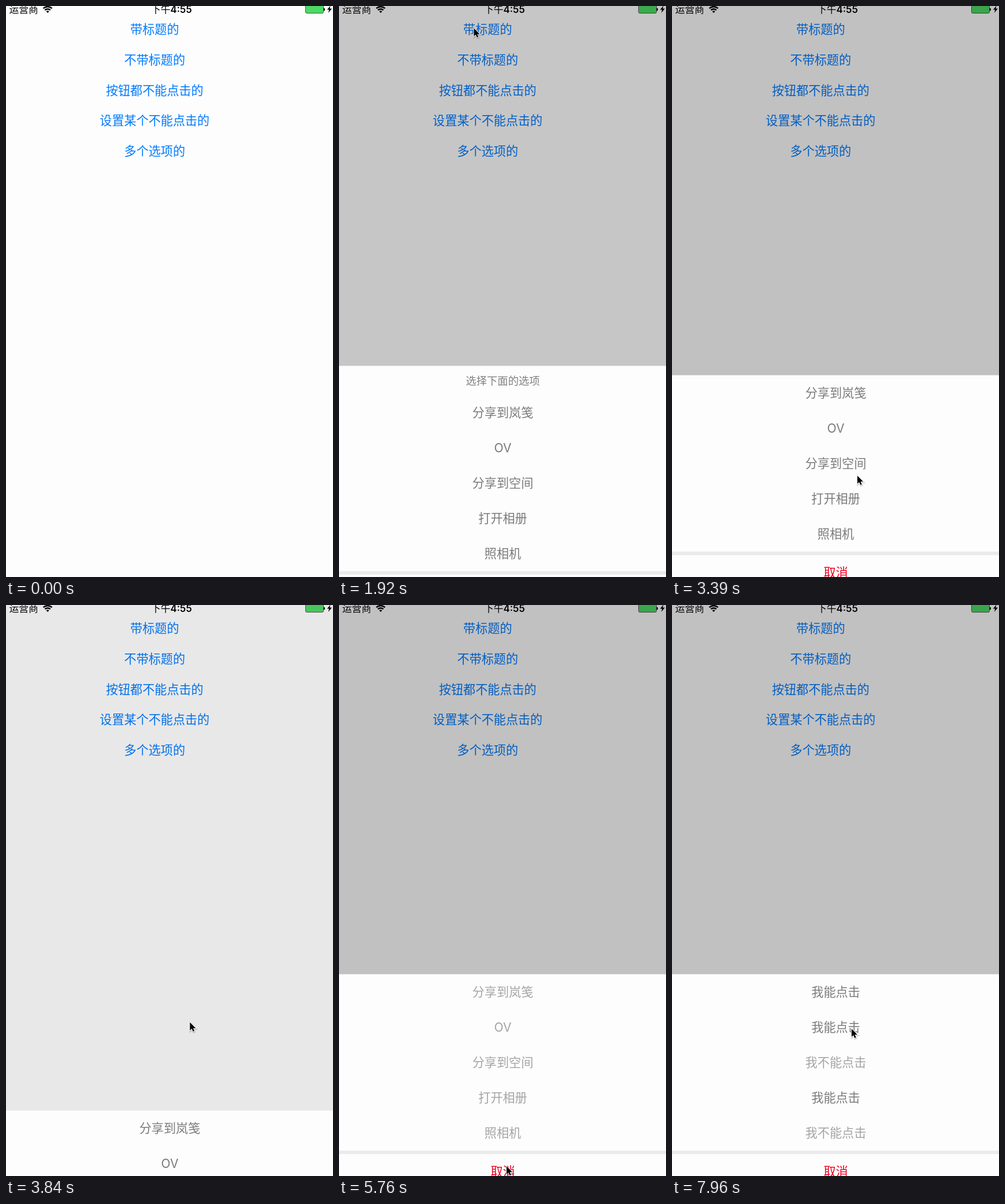
Write an HTML page that moves like this. It is 566 px wide and 989 px high and loops after 8 s.

```html
<!DOCTYPE html>
<html lang="zh-CN">
<head>
<meta charset="utf-8">
<title>Action sheet</title>
<style>
  html, body { margin: 0; width: 100%; height: 100%; overflow: hidden; background: #fdfdfd; }
  svg { display: block; width: 100vw; height: 100vh; }
  text { font-family: Inter, "Noto Sans CJK SC", "Noto Sans CJK", sans-serif; font-size: 21.1px; }
  .mid { text-anchor: middle; }
  .status { font-size: 16.8px; }
</style>
</head>
<body>
<svg id="stage" viewBox="0 0 566 989">
  <rect width="566" height="989" fill="#fdfdfd"/>
  <g id="statusBar">
    <text class="status" x="5.5" y="12.4">运营商</text>
    <g fill="none" stroke="#000" stroke-width="2.5">
      <path d="M64.6 4.2A10.8 10.8 0 0 1 79.6 4.2"/>
      <path d="M67.4 7.2A6.8 6.8 0 0 1 76.8 7.2"/>
    </g>
    <path d="M69.6 9.4A3.7 3.7 0 0 1 74.6 9.4L72.1 12Z"/>
    <text class="status" x="251" y="12.4" font-weight="500">下午</text>
    <text class="status" x="284.6" y="12" font-weight="600">4:55</text>
    <rect x="518.5" y="-4" width="31" height="16.5" rx="2" fill="#4cd964" stroke="#555" stroke-width="1"/>
    <path d="M550 3.2Q552 3.4 552 6T550 8.6Z"/>
    <path d="M561.5 -.5L555.8 6.6H559.3L557.8 12L564 4.6H560.4Z"/>
  </g>
  <g id="buttons" fill="#007aff"></g>
  <rect id="dim" width="566" height="989"/>
  <g id="sheets"></g>
  <g id="cursor">
    <path d="M0 0V14L3.2 11L5.4 16L7.8 15L5.6 10.2H10Z" transform="translate(.6 1.4)"
      fill="none" stroke="#000" stroke-opacity=".16" stroke-width="3"/>
    <path d="M0 0V14L3.2 11L5.4 16L7.8 15L5.6 10.2H10Z" stroke="#fff" stroke-width="1.6" paint-order="stroke"/>
  </g>
</svg>
<script>
const LOOP = 8000, TICK = 147.4;
const SLIDE = 320, FADE = 450, BOTTOM = 1003;
const $ = id => document.getElementById(id);

function add(parent, tag, attrs, text = '') {
  const node = document.createElementNS('http://www.w3.org/2000/svg', tag);
  for (const key in attrs) node.setAttribute(key, attrs[key]);
  node.textContent = text;
  return parent.appendChild(node);
}

const label = (parent, text, x, centre, attrs) =>
  add(parent, 'text', { class: 'mid', x, y: centre + 7.9, ...attrs }, text);

const buttons = ['带标题的', '不带标题的', '按钮都不能点击的', '设置某个不能点击的', '多个选项的']
  .map((text, i) => label($('buttons'), text, 257.3, 40.3 + i * 52.7));

const SHARE = ['分享到岚笺', 'OV', '分享到空间', '打开相册', '照相机'];
const CLICK = ['我能点击', '我能点击', '我不能点击', '我能点击', '我不能点击'];

// Each cycle: button pressed, released (sheet rises), sheet starts to close
const cycles = [
  { press: 400, open: 690, close: 1860, items: SHARE, title: '选择下面的选项' },
  { press: 2640, open: 2820, close: 3640, items: SHARE },
  { press: 4270, open: 4430, close: 5850, items: SHARE, off: [0, 1, 2, 3, 4] },
  { press: 6900, open: 7110, close: 9000, items: CLICK, off: [2, 4] }
];

function buildSheet(cycle) {
  const { items, title, off = [] } = cycle;
  const g = add($('sheets'), 'g', {});
  cycle.top = title ? 589.5 : 639.5;
  add(g, 'rect', { y: cycle.top, width: 566, height: 1012 - cycle.top, fill: '#fdfdfd' });
  if (title) label(g, title, 283.5, 614.2, { fill: '#808080', style: 'font-size:18.3px' });
  items.forEach((text, i) =>
    label(g, text, 283.5, 670 + i * 61, { fill: off.includes(i) ? '#a5a5a5' : '#7b7b7b' }));
  add(g, 'rect', { y: 945, width: 566, height: 6, fill: '#ebebeb' });
  label(g, '取消', 283.5, 981, { fill: '#f0001e', 'font-weight': 500 });
  cycle.node = g;
}
cycles.forEach(buildSheet);

// Pointer stops: time, x, y
const path = [
  [60, 220, -20], [450, 233.5, 38.5], [2070, 233.5, 38.5], [2340, 286, 93.5],
  [2830, 286, 93.5], [3380, 320.8, 813.5], [3700, 320.8, 813.5], [4270, 303, 150],
  [4420, 303, 150], [4569, 303, 188.5], [5010, 309, 771], [5170, 309, 771],
  [5300, 329, 848], [5560, 329, 848], [5720, 290, 972], [5850, 290, 972],
  [6600, 262, 203], [6760, 262, 203], [6900, 266.5, 191], [7100, 266.5, 191],
  [7810, 317, 770], [7830, 317, 770], [7950, 310.8, 734]
];

function ease(v) {
  const x = Math.min(1, Math.max(0, v));
  return x * x * (3 - 2 * x);
}

function pointer(t) {
  const next = path.findIndex(stop => stop[0] > t);
  if (next === 0) return path[0].slice(1);
  if (next < 0) return path[path.length - 1].slice(1);
  const [t0, x0, y0] = path[next - 1], [t1, x1, y1] = path[next];
  const k = ease((t - t0) / (t1 - t0));
  return [x0 + (x1 - x0) * k, y0 + (y1 - y0) * k];
}

function draw(t) {
  let shown = 0;
  cycles.forEach((c, i) => {
    const p = ease((t - c.open) / SLIDE) - ease((t - c.close) / SLIDE);
    c.node.style.display = p > 0 ? '' : 'none';
    c.node.setAttribute('transform', `translate(0 ${(1 - p) * (BOTTOM - c.top)})`);
    shown = Math.max(shown, p);
    buttons[i].setAttribute('opacity', t < c.press ? 1 : 0.2 + 0.8 * ease((t - c.open) / FADE));
  });
  $('dim').setAttribute('opacity', 0.24 * shown);
  $('cursor').setAttribute('transform', `translate(${pointer(t)})`);
}

const held = t => t < 190 ? 0 : Math.floor((t + 10) / TICK) * TICK;

const start = performance.now();
function frame() {
  draw(held((performance.now() - start) % LOOP));
  requestAnimationFrame(frame);
}
frame();
</script>
</body>
</html>
```
